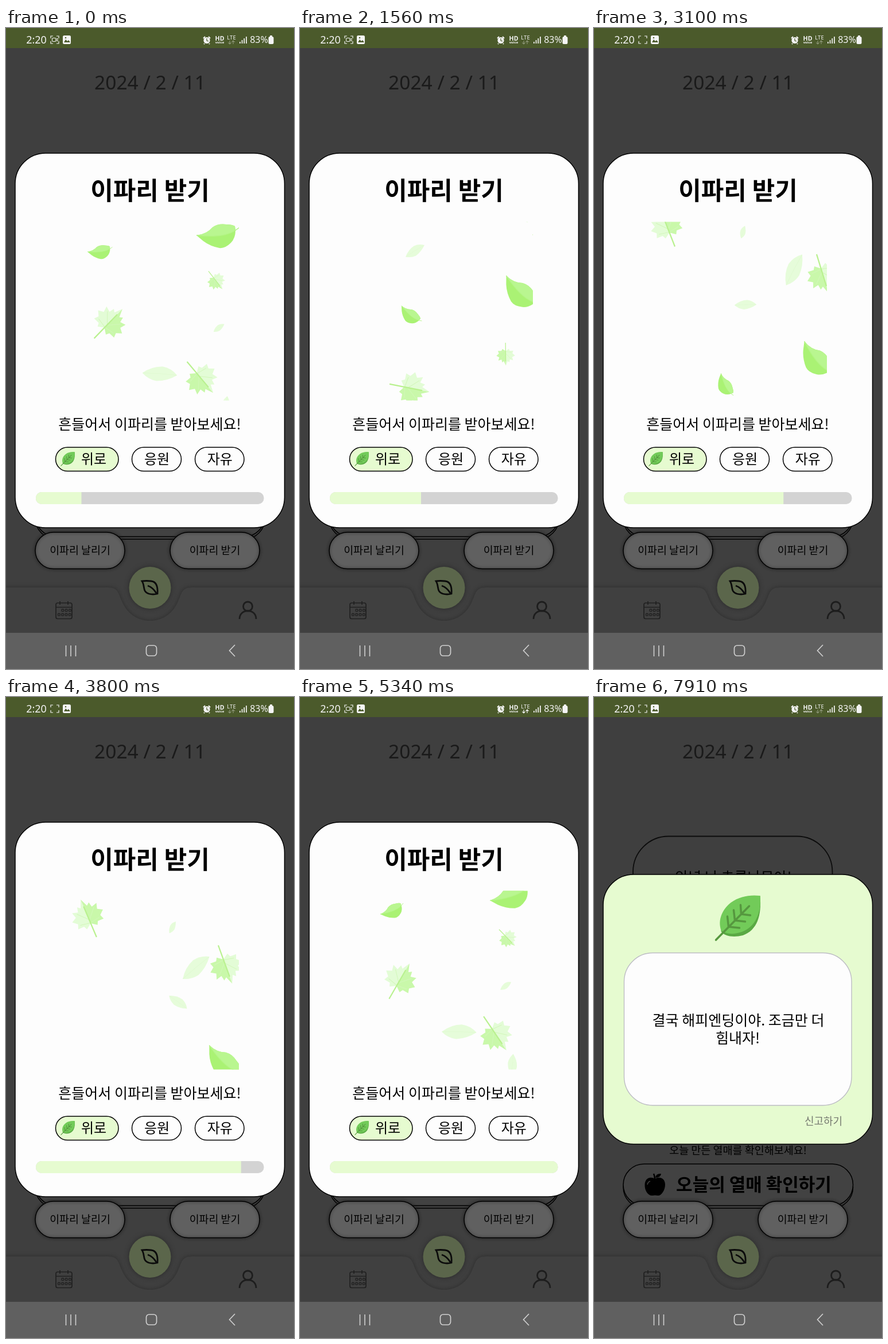
An HTML page with a canvas that plays this animation: 502 px wide and 1116 px high, repeating every 7940 ms.

```html
<!DOCTYPE html>
<html lang="ko">
<head>
<meta charset="utf-8">
<style>
html, body { margin: 0; width: 100%; height: 100%; overflow: hidden; background: #3f3f3f; }
canvas { display: block; width: 502px; height: 1116px; }
</style>
</head>
<body>
<canvas id="stage" width="502" height="1116"></canvas>
<script>
const ctx = document.getElementById('stage').getContext('2d');
const LOOP = 7940, FALL = 5.61;
const KR = '"Noto Sans CJK KR", "Noto Sans CJK", sans-serif';
const LATIN = '"Noto Sans", sans-serif';
const LIME = '#e6fbd0', PAPER = '#fdfdfd', INK = '#000';

function paint(fill, stroke, width = 1.5) {
  if (fill) { ctx.fillStyle = fill; ctx.fill(); }
  if (stroke) { ctx.strokeStyle = stroke; ctx.lineWidth = width; ctx.stroke(); }
}
function box(x0, y0, x1, y1, r, fill, stroke, width) {
  ctx.beginPath();
  ctx.roundRect(x0, y0, x1 - x0, y1 - y0, r);
  paint(fill, stroke, width);
}
function disc(x, y, r, fill, stroke, width) {
  ctx.beginPath();
  ctx.arc(x, y, r, 0, 7);
  paint(fill, stroke, width);
}
function shape(d, fill, stroke, width) {
  const p = new Path2D(d);
  if (fill) { ctx.fillStyle = fill; ctx.fill(p); }
  if (stroke) { ctx.strokeStyle = stroke; ctx.lineWidth = width; ctx.stroke(p); }
}
// y is the optical middle of the line
function text(s, x, y, size, weight = 400, color = INK, family = KR) {
  ctx.font = `${weight} ${size}px ${family}`;
  ctx.fillStyle = color;
  ctx.textAlign = 'center';
  ctx.textBaseline = 'alphabetic';
  ctx.fillText(s, x, y + size * 0.36);
}
function placed(x, y, scale, deg, draw) {
  ctx.save();
  ctx.translate(x, y);
  ctx.rotate(deg * Math.PI / 180);
  ctx.scale(scale, scale);
  draw();
  ctx.restore();
}

// ---- leaves ----
function broadLeaf() {
  shape('M-38-1Q-20-3-10-15Q0-22 14-20Q24-20 29-17L30-10Q30 4 22 12Q12 22 2 21Q-14 18-26 9Z', '#aaf274');
  shape('M-38-1Q-20-3-10-15Q0-22 14-20Q24-20 29-17L30-10Q10 4-38-1Z', '#b9f690');
  shape('M-38-1Q10 4 30-10L37-15', null, '#b4f587', 1.5);
}
function paleLeaf() {
  shape('M-31 0Q-14-13 5-13Q20-11 31 1Q14 12-5 13Q-20 11-31 0Z', '#e6fcda');
  shape('M-30 0Q0-1 30 1', null, '#e0fad2', 1);
}
const LOBES = 'M0 12L10 19L13 13L24 13L21 5L29-2L20-7L23-17L13-14L11-23L6-19L0-33Z';
function mapleLeaf() {
  ctx.save();
  ctx.scale(-1, 1);
  shape(LOBES, '#e3fcd6');
  ctx.restore();
  shape(LOBES, '#c9f8aa');
  shape('M0 5L-16-12M0 6L16-12M0 11L18 8M0 11L-18 8', null, '#d2f7ba', 1);
  shape('M0-20L0 38', null, '#b9f18f', 2.2);
}

// Shared key times in seconds; each leaf starts at one of them.
const KEYS = [0.82, 2.5, 3.8, 5.04, 5.61, 6.43, 8.11, 9.41];
const leaves = [
  { draw: paleLeaf, size: 0.98, from: 1,
    path: [[362, 378, -83], [331, 471, -41], [289, 561, -5], [268, 602, 3], [252, 657, 6]] },
  { draw: paleLeaf, size: 0.62, from: 0,
    path: [[175, 347, -31], [235, 442, -27], [300, 531, 35], [356, 619, 88], [383, 660, 98]] },
  { draw: paleLeaf, size: 0.37, from: 2,
    path: [[290, 401, -62], [344, 482, -41], [371, 522, -36], [402, 580, -70]] },
  { draw: mapleLeaf, size: 1, from: 1,
    path: [[113, 315, -15], [143, 383, -23], [167, 470, 15], [180, 513, 44], [187, 573, 74]] },
  { draw: mapleLeaf, size: 1, from: 1,
    path: [[412, 401, 165], [383, 468, 160], [346, 562, 151], [340, 610, 140], [343, 667, 120]] },
  { draw: mapleLeaf, size: 0.56, from: 3,
    path: [[356, 398, 128], [366, 440, 142], [370, 504, 160], [340, 654, 204]] },
  { draw: broadLeaf, size: 0.58, from: 3,
    path: [[159, 354, -33], [164, 390, 0], [175, 443, 33], [214, 575, 61]] },
  { draw: broadLeaf, size: 1, from: 3,
    path: [[367, 332, -25], [370, 362, 0], [375, 410, 36], [390, 530, 60], [378, 636, 50]] }
];

// Hermite curve through the keys, continued straight beyond both ends.
function along({ path, from }, t, c) {
  const T = i => KEYS[from + i], V = i => path[i][c], last = path.length - 1;
  const slope = i => {
    const a = Math.max(0, i - 1), b = Math.min(last, i + 1);
    return (V(b) - V(a)) / (T(b) - T(a));
  };
  if (t <= T(0)) return V(0) + slope(0) * (t - T(0));
  if (t >= T(last)) return V(last) + slope(last) * (t - T(last));
  let i = 0;
  while (t > T(i + 1)) i++;
  const h = T(i + 1) - T(i), u = (t - T(i)) / h, w = 1 - u;
  return w * w * (1 + 2 * u) * V(i) + u * u * (3 - 2 * u) * V(i + 1)
       + h * u * w * (w * slope(i) - u * slope(i + 1));
}
function fallingLeaves(ms) {
  // playback holds briefly at the end of every 840 ms stretch
  const c = (ms + 20) % 840;
  const t = (ms - Math.max(0, c - 750)) / 1000;
  ctx.save();
  ctx.beginPath();
  ctx.rect(95, 337.5, 311, 311);
  ctx.clip();
  for (const leaf of leaves) {
    for (const time of [t, t + FALL]) {
      const [x, y, a] = [0, 1, 2].map(k => along(leaf, time, k));
      if (y > 280 && y < 700) placed(x, y, leaf.size, a, leaf.draw);
    }
  }
  ctx.restore();
}
function greenLeaf() {
  ctx.lineCap = 'round';
  shape('M38-38C41-4 33 22 8 31C-8 35-24 33-30 24Q-31 12-24 4Z', '#5aa944');
  shape('M38-38C41-8 29 17 6 25C-8 30-22 29-30 22C-36 4-28-14-13-26C2-37 20-40 38-38Z', '#72cb59');
  shape('M-39 39L19-20M-17 16L-19-2M-6 5L-8-13M5-6L4-22M-17 16L2 18M-6 5L12 7M5-6L21-4', null, '#56983f', 3.5);
  ctx.lineCap = 'butt';
}

// ---- phone chrome ----
function statusBar(ms) {
  ctx.fillStyle = '#4b5a2b';
  ctx.fillRect(0, 0, 502, 35);
  const W = '#f4f4f4';
  text('2:20', 53, 20.5, 18, 400, W, LATIN);
  shape('M78 18V14H82M88 14H92V18M92 23V27H88M82 27H78V23', null, W, 1.2);
  const recording = ms < 4500 ? ms % 1090 < 500 : (ms + 420) % 1090 < 670;
  if (recording) {
    box(80.5, 17.5, 87, 23.5, 1.5, null, W, 1.1);
    shape('M87 20L90 18V23L87 21', null, W, 1);
  }
  box(99, 13, 113, 28, 2.5, W);
  shape('M101 25L104 20L107 23L109 21L112 25Z', '#4b5a2b');
  disc(104, 17, 1.2, '#4b5a2b');
  disc(350, 21.5, 5.6, W);
  shape('M350 18V22L353 23', null, '#4b5a2b', 1.2);
  shape('M344 18L347 15M356 18L353 15M346 27L345 28M354 27L355 28', null, W, 2);
  text('HD', 372.5, 18.5, 10.5, 800, W, LATIN);
  text('voice', 372.5, 25, 6, 600, W, LATIN);
  text('LTE', 393, 16.5, 9.5, 500, W, LATIN);
  const busy = ms > 4900 && ms < 6590;
  shape('M390 22V28M387.5 25.5L390 28L392.5 25.5M396 28V22M393.5 24.5L396 22L398.5 24.5', null, busy ? W : '#8a9374', 1.2);
  for (let i = 0; i < 4; i++) {
    ctx.fillStyle = W;
    ctx.fillRect(407 + i * 3.7, 24 - i * 3, 1.7, 3 + i * 3);
  }
  text('83%', 441, 20.5, 16, 400, W, LATIN);
  box(457.5, 15, 466.5, 28, 2.5, W);
  ctx.fillRect(460, 13, 4, 2);
}
function systemNav() {
  ctx.fillStyle = '#606060';
  ctx.fillRect(0, 1053, 502, 63);
  shape('M104.5 1075V1094M113 1075V1094M121.5 1075V1094', null, '#cfcfcf', 1.6);
  box(244.5, 1075, 262.5, 1093, 5, null, '#cfcfcf', 1.7);
  shape('M399 1074L389.5 1084L399 1094', null, '#cfcfcf', 1.7);
}
function shaded(blur, color, draw) {
  ctx.save();
  ctx.shadowBlur = blur;
  ctx.shadowColor = color;
  draw();
  ctx.restore();
}
function appBar() {
  shaded(7, '#2c2c2c', () =>
    shape('M-9 974H178C196 974 196 985 202 998C212 1022 232 1032 251 1032C270 1032 290 1022 300 998C306 985 306 974 324 974H511V1053H-9Z', '#404040'));
  shaded(9, '#2a2a2a', () => disc(251, 974.5, 36.5, '#5b664b'));
  shape('M237 963C243 972 237 981 249 985Q256 987 264 985C265 972 262 964 253 963Q245 962 237 963ZM247 971Q256 974 262 984', null, '#0b0b0b', 2.8);
  box(87, 1001, 115, 1028.5, 3, null, '#202020', 1.7);
  shape('M87 1008.5H115M94 998V1004M108 998V1004', null, '#202020', 1.7);
  for (let i = 0; i < 7; i++) {
    const k = i < 3 ? i : i - 3, x = i < 3 ? 97 + k * 6.3 : 90.5 + k * 6.3;
    box(x, i < 3 ? 1012 : 1019.5, x + 3.7, i < 3 ? 1015.7 : 1023.2, 1, null, '#202020', 1.3);
  }
  disc(421.5, 1007, 8, null, '#1d1d1d', 2.8);
  shape('M407 1029C407 1010 436 1010 436 1029', null, '#1d1d1d', 2.8);
}
function pill(x0, x1, label) {
  shaded(5, '#222', () => box(x0, 878, x1, 941.5, 32, '#606060', INK, 1.5));
  text(label, (x0 + x1) / 2, 909, 18.4);
}
function apple() {
  shape('M106 839C114 834 124 838 124 849C124 859 117 869 111 868Q106 867 102 868C95 869 88 860 88.5 849C89 838 98 834 106 839Z', INK);
  shape('M106 839Q106 834 104 830', null, INK, 2.5);
  shape('M107 837Q108 829 117 830Q116 837 107 837Z', INK);
  shape('M93 849Q94 844 98 843', null, '#3f3f3f', 1.5);
}
function page() {
  ctx.fillStyle = '#3f3f3f';
  ctx.fillRect(0, 0, 502, 1116);
  text('2024 / 2 / 11', 251, 95, 33.5, 500, '#1a1a1a', LATIN);
  box(68, 242.5, 415.5, 560, 62, null, '#0c0c0c', 1.8);
  text('안녕 난 초록나무야!', 243, 314, 25);
  text('오늘 만든 열매를 확인해보세요!', 251, 789, 18.5);
  box(51, 817, 451.5, 890, 37, '#3f3f3f', INK, 1.5);
  box(51, 813, 451.5, 885.5, 37, '#424242', INK, 1.5);
  apple();
  text('오늘의 열매 확인하기', 278.5, 849, 31, 800);
  pill(51, 207, '이파리 날리기');
  pill(286, 442, '이파리 받기');
  appBar();
  systemNav();
}

// ---- dialogs ----
const STEPS = [400, 800, 1660, 2480, 2900, 3400, 3780, 4040];
function chip(x0, x1, label, on) {
  box(x0, 730, x1, 771.5, 21, on ? LIME : PAPER, INK, 1.5);
  text(label, on ? 153 : (x0 + x1) / 2 + 0.5, 750.5, 24);
}
function catchDialog(ms) {
  box(16, 218, 485.5, 870, 53, PAPER, INK, 1.5);
  text('이파리 받기', 251, 284, 43, 800);
  fallingLeaves(ms);
  text('흔들어서 이파리를 받아보세요!', 250.5, 690, 25);
  chip(86.5, 196, '위로', true);
  placed(108, 750, 0.31, 0, greenLeaf);
  chip(219.5, 305.5, '응원');
  chip(329.5, 415, '자유');
  const share = 0.2 + STEPS.filter(s => ms >= s).length / 10;
  ctx.save();
  box(52, 808, 449.5, 829, 10, '#d3d3d3');
  ctx.clip();
  ctx.fillStyle = LIME;
  ctx.fillRect(52, 808, 397.5 * share, 21);
  ctx.restore();
}
function letterDialog() {
  box(16, 309, 485.5, 778.5, 53, LIME, INK, 1.5);
  placed(251.5, 384, 1, 0, greenLeaf);
  box(52.5, 445.5, 449, 711, 50, PAPER, '#bdbdc4', 1.4);
  text('결국 해피엔딩이야. 조금만 더', 251.5, 563, 25);
  text('힘내자!', 250.5, 594, 25);
  text('신고하기', 400, 738.5, 18, 400, '#74786f');
}
function faded(alpha, draw) {
  if (alpha <= 0) return;
  ctx.globalAlpha = Math.min(1, alpha);
  draw();
  ctx.globalAlpha = 1;
}

const start = performance.now();
function frame(now) {
  const ms = Math.max(0, now - start) % LOOP;
  const swap = Math.min(1, Math.max(0, (ms - 5460) / 140));
  page();
  statusBar(ms);
  faded(1 - swap, () => catchDialog(ms));
  faded(swap, letterDialog);
  requestAnimationFrame(frame);
}
requestAnimationFrame(frame);
</script>
</body>
</html>
```
